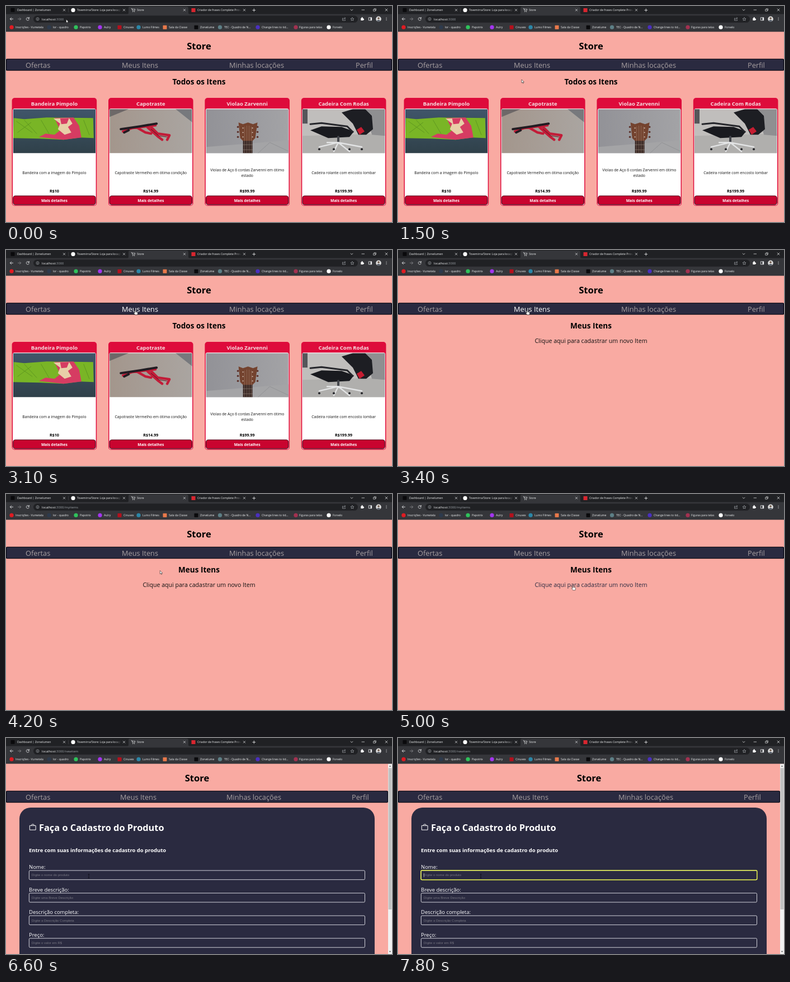
Write an HTML page that moves like this. It is 690 by 388 pixels and loops after 8000 ms.

```html
<!DOCTYPE html>
<html lang="pt-BR">
<head>
<meta charset="utf-8">
<title>Store</title>
<style>
  html, body { margin: 0; width: 100%; height: 100%; overflow: hidden; background: #f9aaa2; }
  svg { display: block; }
  text { font-family: "Open Sans", "Noto Sans", sans-serif; white-space: pre; }
  .b { font-weight: 700; }
  .hint { font-family: "Liberation Sans", Arial, sans-serif; }
</style>
</head>
<body>
<svg id="stage" width="690" height="388" viewBox="0 0 690 388"></svg>
<script>
const NAVY = '#2a2a40', RED = '#de0b3b', BAR = '#35363a', DARK = '#202124', PALE = '#f1f3f4', GREY = '#a8a0a1';
const LOOP = 8000, STEP = 100;

const rect = (x, y, w, h, fill, extra = '') =>
  `<rect x="${x}" y="${y}" width="${w}" height="${h}" fill="${fill}" ${extra}/>`;
const dot = (x, y, r, fill, extra = '') => `<circle cx="${x}" cy="${y}" r="${r}" fill="${fill}" ${extra}/>`;
const shape = (points, fill) => `<polygon points="${points}" fill="${fill}"/>`;
const line = (d, color, width = 1) =>
  `<path d="${d}" fill="none" stroke="${color}" stroke-width="${width}" stroke-linecap="round" stroke-linejoin="round"/>`;
const text = (x, y, str, size, fill, extra = '') =>
  `<text x="${x}" y="${y}" font-size="${size}" fill="${fill}" ${extra}>${str}</text>`;
const mid = (x, y, str, size, fill, extra = '') => text(x, y, str, size, fill, `text-anchor="middle" ${extra}`);
const BOLD = 'class="b"';

// Browser window
function tab(x, label, width) {
  return `<svg x="${x}" y="0" width="${width}" height="15">${text(0, 9.2, label, 5.1, PALE)}</svg>`;
}

function browser() {
  const cross = x => line(`M${x - 1.7} 5.6l3.4 3.4m0-3.4l-3.4 3.4`, PALE, .7);
  let s = rect(0, 0, 690, 15, DARK) + rect(0, 14.5, 690, 31.8, BAR);
  s += `<path d="M216 15q3 0 3-3V4q0-3 3-3h101q3 0 3 3v8q0 3 3 3z" fill="${BAR}"/>`;
  s += rect(8.5, 3.8, 7, 7, '#0a0a0c', 'rx="1"') + dot(120, 7.4, 3.6, '#fff') + rect(331.5, 4, 7, 7, '#d8262f');
  s += tab(20, 'Dashboard | Zorvelumen', 80) + tab(127, 'Tovemirra/Store: Loja para locação', 78);
  s += tab(234, 'Store', 60) + tab(342, 'Criador de frases Complete Prosa', 78);
  s += rect(194, 2, 12, 11, 'url(#fade)') + rect(409, 2, 12, 11, 'url(#fade)');
  s += [104, 211, 319, 426].map(cross).join('') + line('M111.5 4v7', '#55565a', .5);
  s += line('M224 4.7h1.3l1 4h3.6l.9-3h-5.1', PALE, .7) + dot(226.7, 10.2, .6, PALE) + dot(229.6, 10.2, .6, PALE);
  s += line('M440.8 7.5h5m-2.5-2.5v5', PALE, .8) + line('M616 6.2l2 2 2-2', PALE, .7);
  s += line('M636 7h4.6', PALE, .7) + line('M657 6h3.2v3.2h-3.2zM658.2 6v-1.2h3.2v3.2h-1.2', PALE, .6);
  s += line('M678 5l4 4m0-4l-4 4', PALE, .7);

  s += line('M12.6 23.3H7.4m2.3-2.4l-2.4 2.4 2.4 2.4', PALE, .8);
  s += line('M21.4 23.3h5.2m-2.3-2.4l2.4 2.4-2.4 2.4', '#8a8b8f', .8);
  s += line('M41.1 22a2.6 2.6 0 1 0 .2 2.2M41.3 20.3v2h-2', PALE, .8);
  s += rect(49, 17.2, 580, 12.6, DARK, 'rx="6.3"');
  s += dot(56.5, 23.4, 2.5, 'none', 'stroke="#bdc1c6" stroke-width=".6"') + line('M56.5 23.3v1.4m0-2.7v.1', '#bdc1c6', .6);
  s += text(64, 25.6, `<tspan fill="${PALE}">localhost</tspan>:3000<tspan id="path"></tspan>`, 5.85, '#9aa0a6');
  s += line('M603 22h-1.5v4h5v-1.3m-3-.6q.3-2.3 3-2.3m-1.2-1.4l1.4 1.4-1.4 1.4', '#bdc1c6', .6);
  s += `<path d="M619 20.5l.9 2 2.1.2-1.6 1.4.5 2.1-1.9-1.1-1.9 1.1.5-2.1-1.6-1.4 2.1-.2z" fill="none" stroke="#bdc1c6" stroke-width=".6"/>`;
  s += rect(634.3, 21.7, 4.6, 4.4, '#fff', 'rx=".6"') + dot(636.6, 21.2, 1.1, '#fff') + dot(639.2, 24, 1, '#fff');
  s += line('M648.7 20.8h5v5h-5z', PALE, .8) + rect(651.6, 20.8, 2.2, 5, PALE);
  s += dot(666, 23.4, 4.8, '#dcdcdc') + dot(666, 22, 1.8, '#6b5648') + `<path d="M662.6 26.7q3.4-4 6.8 0q-3.4 2.5-6.8 0z" fill="#59606b"/>`;
  s += [21.1, 23.3, 25.5].map(y => dot(680, y, .6, PALE)).join('');

  const marks = [
    [10, 17, '#e01b22', 'Inscrições - Vumetela'], [77, 84, '#2d3a4d', 'lor - quadro'],
    [125, 132, '#2fc25b', 'Papotrix'], [168, 175, '#a435f0', 'Aulry'], [203, 210, '#b5101c', 'Cinuvex', 1],
    [237, 244, '#2b87a8', 'Lumo Filmes'], [284, 291, '#e9794a', 'Sala da Classe', 1], [340, 347, '#0a0a0c', 'Zorvelume', 1],
    [382.5, 390, '#5d7f86', 'TEC - Quadro de N...'], [450, 457, '#4a2fc0', 'Change lines to tid...'],
    [518, 524, '#a33150', 'Figuras para telas'], [577, 584, '#fff', 'Forvelo']
  ];
  for (const [cx, x, color, label, square] of marks) {
    s += square ? rect(cx - 3.5, 34.7, 7, 7, color, 'rx=".8"') : dot(cx, 38.2, 3.6, color);
    s += text(x, 40, label, 5.05, PALE);
  }
  return s;
}

// Store pages
const LINKS = ['Ofertas', 'Meus Itens', 'Minhas locações', 'Perfil'];

function header(width, xs) {
  return mid(width / 2, 78, 'Store', 16.6, '#000', BOLD) +
    rect(.6, 95.3, width - 1.2, 20.4, NAVY, 'rx="1.5" stroke="#0b0b16" stroke-width="1.3"') +
    LINKS.map((l, i) => text(xs[i], 111, l, 12.75, GREY, i === 1 ? 'class="mine"' : '')).join('');
}
const WIDE = [35, 207, 399, 625], NARROW = [35, 204, 394, 618];

const photos = [
  rect(0, 0, 148, 80, 'url(#slate)') +
    shape('1,16 20,18 60,15 143,16 144,52 120,51 90,55 48,53 0,52', '#79b526') +
    shape('74,16 108,15 118,30 122,51 90,55 46,50 58,44 74,46 84,38', '#d63c62') +
    shape('72,17 100,16 106,26 98,32 104,42 92,46 80,36 84,26', '#e8cfa8') +
    shape('84,17 100,16 96,26 86,27', '#d63c62') +
    line('M6 22l28 20M20 20l22 24M8 42l24-18M50 20l14 24M126 20l10 26', '#5f9820', 1),
  rect(0, 0, 148, 80, 'url(#desk)') + shape('0,0 34,0 0,14', '#6d6868') + shape('118,0 148,0 148,24', '#77797d') +
    line('M24 40l16-6 42-5M50 34l14 8 10 2M68 33l18 16 8 6M72 30l14 14 21 3-4 8', '#c21c38', 4.4) +
    line('M20 36L54 31 84 26M34 38l-8 4', '#221c22', 4) +
    line('M74 36l14 12 14 2', '#5a1420', 1),
  rect(0, 0, 148, 80, 'url(#wall)') + shape('0,68 148,56 148,80 0,80', '#a4a4a6') + line('M92 80l22-20 34 16', '#85868a', .6) +
    [32, 41, 50].map(y => dot(57, y, 1.8, '#5b2f28') + dot(92, y, 1.8, '#5b2f28')).join('') +
    shape('58,24 66,27 75,24 84,27 92,24 88,52 82,58 67,58 61,52', '#74432f') +
    [34, 42, 50].map(y => dot(66, y, 1, '#d8c8bc') + dot(83, y, 1, '#d8c8bc')).join('') +
    rect(66, 57, 17, 23, '#3a2926') + line('M69 32v48M73 30v50M77 30v50M81 32v48', '#b6a08e', .4) +
    line('M66 64h17M66 73h17', '#a89a90', .5),
  rect(0, 0, 148, 80, '#c0bebc') + shape('0,48 148,44 148,80 0,80', '#b0afad') + rect(0, 0, 9, 26, '#55565a') +
    shape('112,0 148,0 148,48 124,46', '#8f8f91') +
    shape('70,6 90,0 112,0 124,12 126,36 114,46 100,46 90,26', '#1d1e23') +
    shape('97,37 105,32 111,40 102,46', '#c51d31') +
    shape('14,38 34,31 70,32 92,40 84,50 46,52', '#191a1f') +
    line('M14 27l20-2 46 6 10 10', '#25262b', 3) + line('M64 50v10', '#44464c', 4) +
    line('M30 68l34-8 42 8M64 60l-8 16M64 60l20 16M44 60l20 0', '#e2e3e4', 2.4) +
    [30, 56, 84, 106].map(x => dot(x, 72, 2, '#28292d')).join('')
];

const items = [
  ['Bandeira Pimpolo', 'R$10', 'Bandeira com a imagem do Pimpolo'],
  ['Capotraste', 'R$14.99', 'Capotraste Vermelho em ótima condição'],
  ['Violao Zarvenni', 'R$99.99', 'Violao de Aço 6 cordas Zarvenni em ótimo', 'estado'],
  ['Cadeira Com Rodas', 'R$199.99', 'Cadeira rolante com encosto lombar']
];

function card([name, price, ...lines], i) {
  const x = 10.6 + 172.4 * i, c = x + 75.8, top = lines.length > 1 ? 297 : 301.7;
  return rect(x, 165, 151.6, 194, RED, 'rx="5"') +
    rect(x + 1.5, 184.2, 148.6, 173.6, '#fff', 'rx="3"') +
    `<svg x="${x + 2.2}" y="185.2" width="147.2" height="79">${photos[i]}</svg>` +
    mid(c, 179, name, 9.45, '#f6dfe2', BOLD) +
    lines.map((l, k) => mid(c, top + 9.7 * k, l, 6.75, '#141414')).join('') +
    mid(c, 335, price, 7.1, '#000', BOLD) +
    rect(x + 2.3, 341, 147, 15.9, '#c9042f', 'rx="4" stroke="#52041a" stroke-width="1.2"') +
    mid(c, 351.6, 'Mais detalhes', 6.8, '#fff', BOLD);
}

const homePage = () => header(690, WIDE) + mid(345, 141, 'Todos os Itens', 13.55, '#000', BOLD) + items.map(card).join('');

const minePage = () => header(690, WIDE) + mid(345, 141, 'Meus Itens', 13.55, '#000', BOLD) +
  mid(345, 167, 'Clique aqui para cadastrar um novo Item', 10.6, '#111', 'id="add"');

function formPage() {
  const fields = [['Nome:', 'Digite o nome do produto'], ['Breve descrição:', 'Digite uma Breve Descrição'],
    ['Descrição completa:', 'Digite a Descrição Completa'], ['Preço:', 'Digite o valor em R$']];
  let s = header(683, NARROW) + rect(24, 125, 635, 300, NAVY, 'rx="20"');
  s += line('M42.7 157.3h10.4v7.8h-10.4zM45.6 157.2v-.6q0-1.7 2.3-1.7t2.3 1.7v.6', '#fff', 1);
  s += text(59, 167, 'Faça o Cadastro do Produto', 16.36, '#fff', BOLD);
  s += text(41, 204.7, 'Entre com suas informações de cadastro do produto', 9.46, '#fff', BOLD);
  fields.forEach(([label, hint], i) => {
    const y = 238 + 40.6 * i;
    s += text(41, y - 3, label, 9.46, '#fff');
    s += rect(41.3, y, 600.2, 16.4, NAVY, 'rx="1.8" stroke="#e4e4ea" stroke-width=".9"');
    s += text(46, y + 10.3, hint, 5.97, '#777681', 'class="hint"');
  });
  s += rect(41, 237.7, 600.8, 17, 'none', 'id="focus" rx="2" stroke="#e3ee4a" stroke-width="1.5"');
  s += rect(45.9, 243.2, .6, 6.6, '#fff', 'id="caret"');
  s += rect(683, 46.3, 7, 341.7, '#f1f1f1') + rect(683.6, 54, 5.8, 254, '#c1c1c1');
  return s + shape('684.8,51.4 688.2,51.4 686.5,49.2', '#505050') + shape('684.8,382.8 688.2,382.8 686.5,385', '#505050');
}

const pointers = {
  arrow: '<path d="M0 0v6.2l1.5-1.3 1 2.2.9-.4-1-2.1h2z" fill="#fff" stroke="#111" stroke-width=".55"/>',
  hand: '<path d="M-.7 .5q.8-1 1.5 0v3l3 .7q.8.3.7 1.2l-.6 3.4h-4.2l-2.4-3.4q-.2-1 .8-.8l1.2.9z" fill="#fff" stroke="#111" stroke-width=".55"/>',
  beam: '<path d="M-1.3-3.4H1.3M0-3.4v6.8M-1.3 3.4H1.3" stroke="#08080f" stroke-width=".7"/>'
};

const gradient = (id, from, to, dir = '') =>
  `<linearGradient id="${id}" ${dir}><stop stop-color="${from}"/><stop offset="1" stop-color="${to}"/></linearGradient>`;
const group = (id, body) => `<g id="${id}">${body}</g>`;
const stage = document.getElementById('stage');
stage.innerHTML = `<defs>${gradient('fade', '#20212400', DARK)}${gradient('slate', '#40566a', '#2f4049', 'x2="0" y2="1"')}
  ${gradient('desk', '#a3968c', '#aaa5a1')}${gradient('wall', '#929297', '#a3a3a6')}</defs>` +
  rect(0, 0, 690, 388, '#f9aaa2') + group('home', homePage()) + group('mine', minePage()) + group('form', formPage()) +
  browser() + group('pointer', Object.entries(pointers).map(([k, v]) => group(k, v)).join(''));

// Motion: [time, x, y] for the pointer tip
const moves = [[0, 107.5, 24], [100, 109, 27], [900, 208, 122], [1500, 221, 132], [2000, 221, 132], [2100, 215, 132.5],
  [2300, 215, 132.5], [2500, 196, 137], [3100, 231, 107.5], [3700, 231, 107.5], [4600, 307, 159], [5000, 313, 164],
  [5600, 313, 164], [5700, 310.5, 165], [5800, 310.5, 165], [6600, 148, 248], [LOOP, 148, 248]];

const $ = id => document.getElementById(id);
const show = (id, on) => $(id).style.display = on ? '' : 'none';
const inside = (p, x, y, w, h) => p.x >= x && p.x <= x + w && p.y >= y && p.y <= y + h;

function pointerAt(t) {
  const i = moves.findIndex(m => m[0] > t);
  const [t0, x0, y0] = moves[i - 1], [t1, x1, y1] = moves[i];
  const u = (t - t0) / (t1 - t0), e = u * u * (3 - 2 * u);
  return { x: x0 + (x1 - x0) * e, y: y0 + (y1 - y0) * e };
}

function draw(t) {
  const page = t < 3400 ? 'home' : t < 5700 ? 'mine' : 'form';
  for (const id of ['home', 'mine', 'form']) show(id, id === page);
  $('path').textContent = t < 3500 ? '' : t < 5900 ? '/myitems' : '/newitem';

  const p = pointerAt(t);
  const onNav = inside(p, 207, 98, 64, 17);
  const onAdd = page === 'mine' && inside(p, 244, 156, 202, 15);
  const onField = page === 'form' && inside(p, 41, 238, 600, 17);
  const kind = onNav || onAdd ? 'hand' : onField ? 'beam' : 'arrow';
  for (const k in pointers) show(k, k === kind);
  $('pointer').setAttribute('transform', `translate(${p.x.toFixed(2)} ${p.y.toFixed(2)})`);
  for (const el of document.querySelectorAll('.mine')) el.setAttribute('fill', onNav ? '#fff' : GREY);
  $('add').setAttribute('fill', onAdd ? NAVY : '#111');

  show('focus', t >= 7100);
  show('caret', t >= 7100 && (t < 7600 || t >= 7800));
}

function tick() {
  const t = performance.now() % LOOP;
  draw(Math.floor(t / STEP) * STEP);
  requestAnimationFrame(tick);
}
tick();
</script>
</body>
</html>
```
